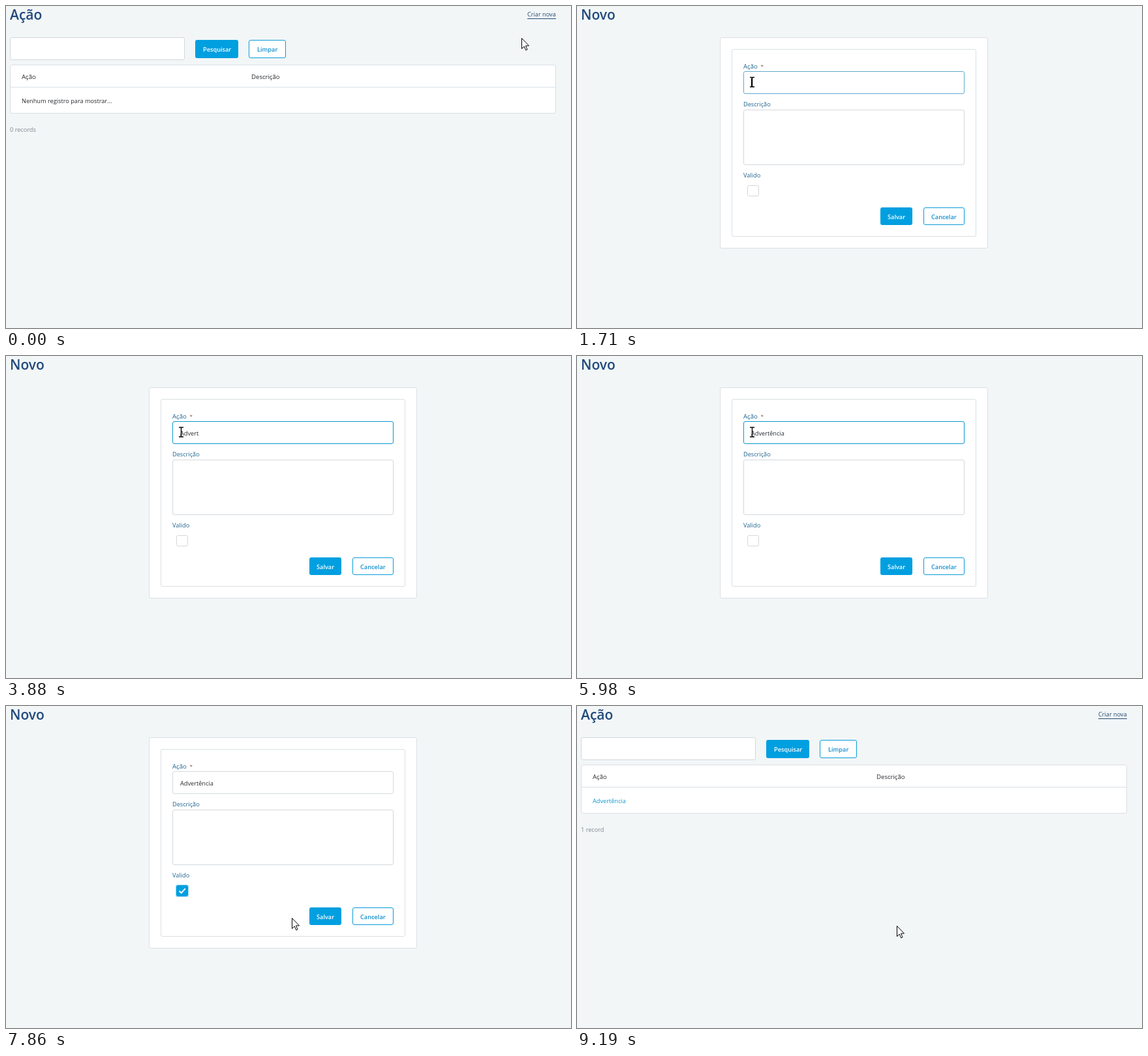
An HTML page for the animation above (9270 ms loop, 866 by 494 pixels).

```html
<!DOCTYPE html>
<html lang="pt">
<head>
<meta charset="utf-8">
<title>Ação</title>
<style>
  html, body { margin: 0; width: 100%; height: 100%; overflow: hidden; background: #f2f6f7; }
  svg { display: block; width: 100vw; height: 100vh; }
  text { font: 9.2px "Open Sans", "Noto Sans", sans-serif; fill: #272b30; white-space: pre; }
  .title { font-size: 21px; font-weight: 600; fill: #224b7c; }
  .label { fill: #1f648f; }
  .head { font-size: 9.6px; }
  .btn { font-weight: 600; fill: #fff; }
  .alt { fill: #0f8fcd; }
  .note { fill: #7f878e; }
  .box { fill: #fff; stroke: #dbe0e4; }
  .field { fill: #fff; stroke: #d3d8dd; }
  .solid { fill: #009fe0; }
  .hollow { fill: #fff; stroke: #0a9cd9; }
  .line { fill: none; stroke: #000; }
  .point { fill: #fff; stroke: #000; stroke-linejoin: round; }
</style>
</head>
<body>
<svg id="stage" viewBox="0 0 866 494"></svg>
<script>
const LOOP = 9270, OPEN = 930, SAVED = 8890;
const WORD = 'Advertência';
const KEYS = [2180, 2490, 2550, 2700, 2860, 3480, 4980, 5050, 5190, 5360, 5510];
const BLINKS = [1700, 3330, 3480, 3880, 4410, 4910, 4980, 5980, 6460, 6990];

// start, end, steps, x, y, eased
const MOVES = [
  [80, 395, 5, 811, 2, true],
  [473, 630, 3, 813, 14, true],
  [1160, 1470, 5, 268, 117, true],
  [6300, 7160, 12, 270, 288, true],
  [7700, 7860, 3, 438, 325, false],
  [7940, 8260, 5, 488, 325, false],
  [9040, 9190, 3, 490, 337, false]
];
const INPUT = [255, 100, 594, 135], AREA = [255, 159, 594, 244];
const CHECK = [261, 275, 279, 292], SAVE = [465, 309, 514, 336];
const LINK = [799, 7, 843, 20];

const text = (x, y, s, cls = '', id = '') =>
  `<text x="${x}" y="${y}" class="${cls}" id="${id}">${s}</text>`;
const frame = ([x, y, r, b], cls, id = '', rx = 2.5) =>
  `<rect x="${x + .5}" y="${y + .5}" width="${r - x - 1}" height="${b - y - 1}" rx="${rx}" class="${cls}" id="${id}"/>`;
const block = ([x, y, r, b], id = '') =>
  `<rect x="${x}" y="${y}" width="${r - x}" height="${b - y}" rx="3" class="solid" id="${id}"/>`;

function grip() {
  let s = '';
  for (let row = 0; row < 3; row++)
    for (let col = 2 - row; col < 3; col++)
      s += `<rect x="${582 + col * 3}" y="${233.5 + row * 3}" width="2" height="2"/>`;
  return `<g id="grip" fill="#b9bec2">${s}</g>`;
}

const list = `<g id="list">
  ${text(6, 21, 'Ação', 'title')}
  ${text(799, 16, 'Criar nova', '', 'link')}
  <path d="M799 19.5H843" stroke="#274b78"/>
  ${frame([6, 48, 274, 83], 'field')}
  ${block([290, 52, 356, 80])}${text(302, 70, 'Pesquisar', 'btn')}
  ${frame([372, 52, 429, 80], 'hollow')}${text(385, 70, 'Limpar', 'btn alt')}
  ${frame([6, 90, 843, 165], 'box')}
  <path d="M7 124.5H842" stroke="#dbe0e4"/>
  ${text(24, 112, 'Ação', 'head')}
  ${text(376, 112, 'Descrição', 'head', 'column')}
  ${text(24, 149, '', '', 'row')}
  ${text(6, 193, '', 'note', 'total')}
</g>`;

const form = `<g id="form">
  ${text(6, 21, 'Novo', 'title')}
  ${frame([219, 48, 630, 372], 'box')}
  ${frame([237, 66, 612, 354], 'box')}
  ${text(255, 96, 'Ação', 'label head')}
  <text x="281.5" y="95" style="font-size:8px;fill:#8d4a4e">*</text>
  ${frame(INPUT, 'field', 'input')}
  ${text(267, 122, '', '', 'typed')}
  <path id="caret" class="line" d="M.5 111V124"/>
  ${text(255, 154, 'Descrição', 'label')}
  ${frame(AREA, 'field', 'area')}${grip()}
  ${text(255, 263, 'Valido', 'label')}
  <rect id="glow" x="260" y="274" width="20" height="19" rx="3" fill="#9ed8f2"/>
  ${frame(CHECK, 'field', '', 2)}
  <g id="tick">
    ${block(CHECK)}
    <path d="M265.5 283.7L268.7 286.9L274.8 280.2" fill="none" stroke="#fff" stroke-width="2"/>
  </g>
  ${block(SAVE, 'save')}${text(476, 327, 'Salvar', 'btn')}
  ${frame([531, 309, 594, 336], 'hollow')}${text(543, 327, 'Cancelar', 'btn alt')}
</g>`;

const cursors = `<g id="cursor">
  <path id="arrow" class="point" d="M.5 .5V16.5L4.2 13L6.8 18.8L9 17.8L6.5 12H11.5Z"/>
  <path id="beam" class="line" stroke-width="1.4" d="M-3 -7.5H0L.5 -7L1 -7.5H4M.5 -7V6.5M-3 7H0L.5 6.5L1 7H4"/>
  <g id="hand" transform="translate(-6 0)">
    <path class="point" d="M5.5 13.5V2Q5.5 .5 7 .5T8.5 2V7.5Q8.5 6.8 10 6.8T11.5 8.3Q12 7.8 13 8T14.3 9.3Q15 9 15.8 9.3T16.5 11V15L14.5 18.5V21.5H6.8V19L2.5 13.5Q.3 11 1 10Q2.2 9 3.5 10.5Z"/>
    <path class="line" d="M8.5 7.5V11M11.5 8.3V11.5M14.3 9.5V12"/>
  </g>
</g>`;

document.getElementById('stage').innerHTML = list + form + cursors;
const ui = {};
document.querySelectorAll('#stage [id]').forEach(el => { if (el.id) ui[el.id] = el; });

const show = (el, on) => { el.style.display = on ? '' : 'none'; };
const within = ([x, y, r, b], p) => p.x >= x && p.x < r && p.y >= y && p.y < b;
const passed = (times, t) => times.filter(at => t >= at).length;

// Progress from 0 to 1 in n equal jumps, the first at a and the last at b
function ramp(t, a, b, n) {
  const k = Math.floor((t - a) / (b - a) * (n - 1) + 1.01);
  return Math.max(0, Math.min(n, k)) / n;
}

function mix(from, to, k) {
  return `rgb(${from.map((v, i) => Math.round(v + (to[i] - v) * k))})`;
}

function pointer(t) {
  const p = { x: 790, y: 49 };
  for (const [a, b, n, x, y, eased] of MOVES) {
    let k = ramp(t, a, b, n);
    if (eased) k = k * k * (3 - 2 * k);
    p.x = Math.round(p.x + (x - p.x) * k);
    p.y = Math.round(p.y + (y - p.y) * k);
  }
  return p;
}

function drawList(done) {
  ui.column.setAttribute('x', done ? 459 : 376);
  ui.row.textContent = done ? WORD : 'Nenhum registro para mostrar...';
  ui.row.style.fill = done ? '#0f98d2' : '';
  ui.total.textContent = done ? '1 record' : '0 records';
}

function drawForm(t, p) {
  const focus = ramp(t, 1620, 1860, 4) - ramp(t, 7240, 7470, 4);
  const checked = ramp(t, 7240, 7470, 4);
  const base = within(INPUT, p) ? [185, 192, 199] : [214, 219, 223];
  ui.input.style.stroke = mix(base, [10, 150, 208], focus);
  ui.area.style.stroke = within(AREA, p) ? '#b9c0c7' : '';
  show(ui.grip, t < 1010);

  ui.typed.textContent = WORD.slice(0, passed(KEYS, t));
  const end = ui.typed.textContent ? ui.typed.getComputedTextLength() : 0;
  ui.caret.setAttribute('transform', `translate(${Math.round(267 + end)} 0)`);
  show(ui.caret, t < 7240 && passed(BLINKS, t) % 2);

  ui.tick.style.opacity = checked;
  ui.glow.style.opacity = checked * (1 - ramp(t, 8490, 8570, 2));
  ui.save.style.fill = mix([0, 159, 224], [0, 143, 202], within(SAVE, p) ? 1 : 0);
}

function draw(t) {
  const p = pointer(t);
  const editing = t >= OPEN && t < SAVED;
  show(ui.list, !editing);
  show(ui.form, editing);
  if (editing) drawForm(t, p);
  else drawList(t >= SAVED);

  const beam = editing && (within(INPUT, p) || within(AREA, p));
  const hand = editing ? within(CHECK, p) || within(SAVE, p) : t < OPEN && within(LINK, p);
  ui.link.style.fill = hand && !editing ? '#0f8fcd' : '#24466f';
  show(ui.beam, beam);
  show(ui.hand, hand);
  show(ui.arrow, !beam && !hand);
  ui.cursor.setAttribute('transform', `translate(${p.x} ${p.y})`);
}

const start = performance.now();
function tick() {
  draw((performance.now() - start) % LOOP);
  requestAnimationFrame(tick);
}
tick();
</script>
</body>
</html>
```
